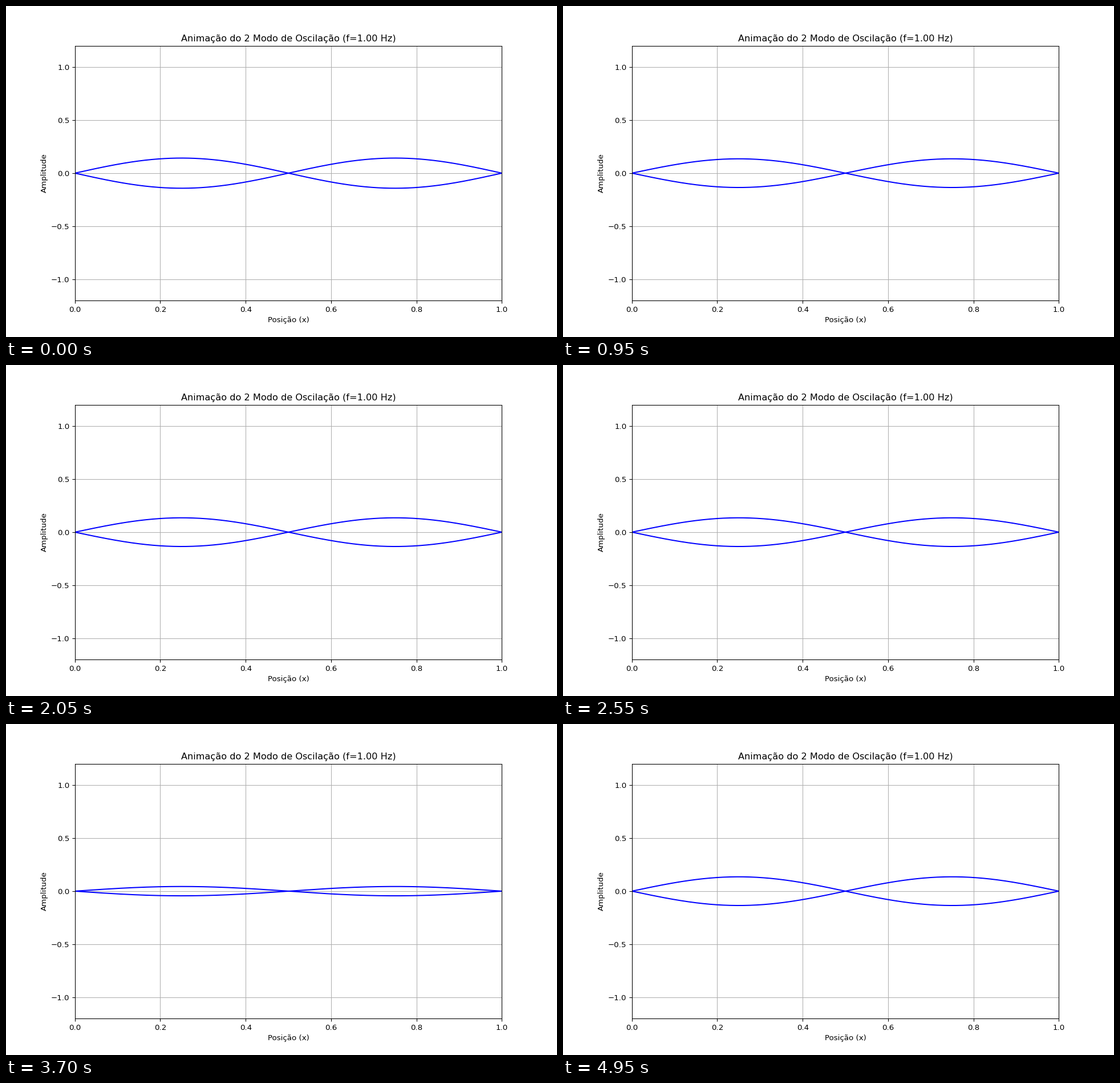
These frames come from a looping animation (966x580 px, 5 s). A matplotlib script:

```python
import numpy as np
import matplotlib.pyplot as plt
from matplotlib.animation import FuncAnimation

FRAMES = 100
INTERVAL = 50        # ms
FREQ = 1.0           # Hz
MODE = 2
AMPLITUDE = 0.142

plt.rcParams["font.family"] = "DejaVu Sans"

fig, ax = plt.subplots(figsize=(10, 6.0042), dpi=96.6)
ax.set_xlim(0, 1)
ax.set_ylim(-1.2, 1.2)
ax.set_xlabel("Posição (x)")
ax.set_ylabel("Amplitude")
ax.set_title(f"Animação do {MODE} Modo de Oscilação (f={FREQ:.2f} Hz)")
ax.grid(True)

x = np.linspace(0, 1, 500)
shape = AMPLITUDE * np.sin(MODE * np.pi * x)
upper, = ax.plot(x, shape, color="blue", lw=1.5)
lower, = ax.plot(x, -shape, color="blue", lw=1.5)


def update(frame):
    t = frame * INTERVAL / 1000
    y = shape * np.cos(2 * np.pi * FREQ * t)
    upper.set_ydata(y)
    lower.set_ydata(-y)
    return upper, lower


anim = FuncAnimation(fig, update, frames=FRAMES, interval=INTERVAL,
                     repeat=True, repeat_delay=0, blit=False)
plt.show()
```
